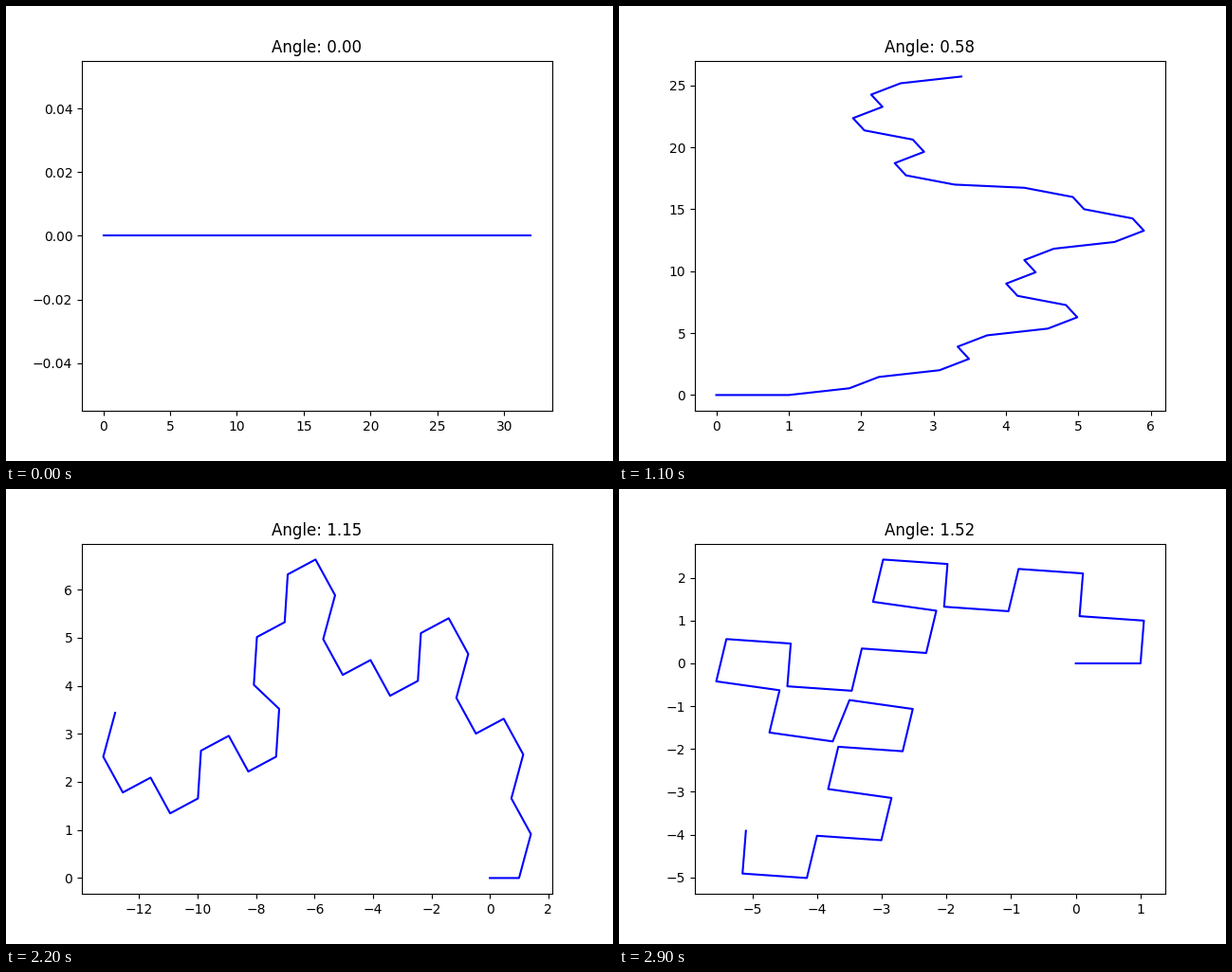
Recreate the animation shown at these times as a matplotlib script. Size 640 by 480 pixels, loop 3 s.

```python
import numpy as np
import matplotlib.pyplot as plt
from matplotlib.animation import FuncAnimation

FRAMES = 30
INTERVAL = 100
SEGMENTS = 32


def fold_turn(n):
    """Direction of the n-th crease of a paper strip: +1 left, -1 right."""
    while n % 2 == 0:
        n //= 2
    return 1 if n % 4 == 1 else -1


TURNS = [fold_turn(n) for n in range(1, SEGMENTS)]
HEADINGS = np.concatenate(([0], np.cumsum(TURNS)))


def folded_strip(angle):
    x = np.cumsum(np.cos(HEADINGS * angle))
    y = np.cumsum(np.sin(HEADINGS * angle))
    return np.insert(x, 0, 0.0), np.insert(y, 0, 0.0)


fig, ax = plt.subplots(figsize=(6.4, 4.8), dpi=100)


def draw(frame):
    angle = frame * np.pi / 2 / FRAMES
    ax.clear()
    ax.plot(*folded_strip(angle), color="blue")
    ax.set_title(f"Angle: {angle:.2f}")


anim = FuncAnimation(fig, draw, frames=FRAMES, init_func=lambda: draw(0),
                     interval=INTERVAL, repeat=True, repeat_delay=0)
plt.show()
```
